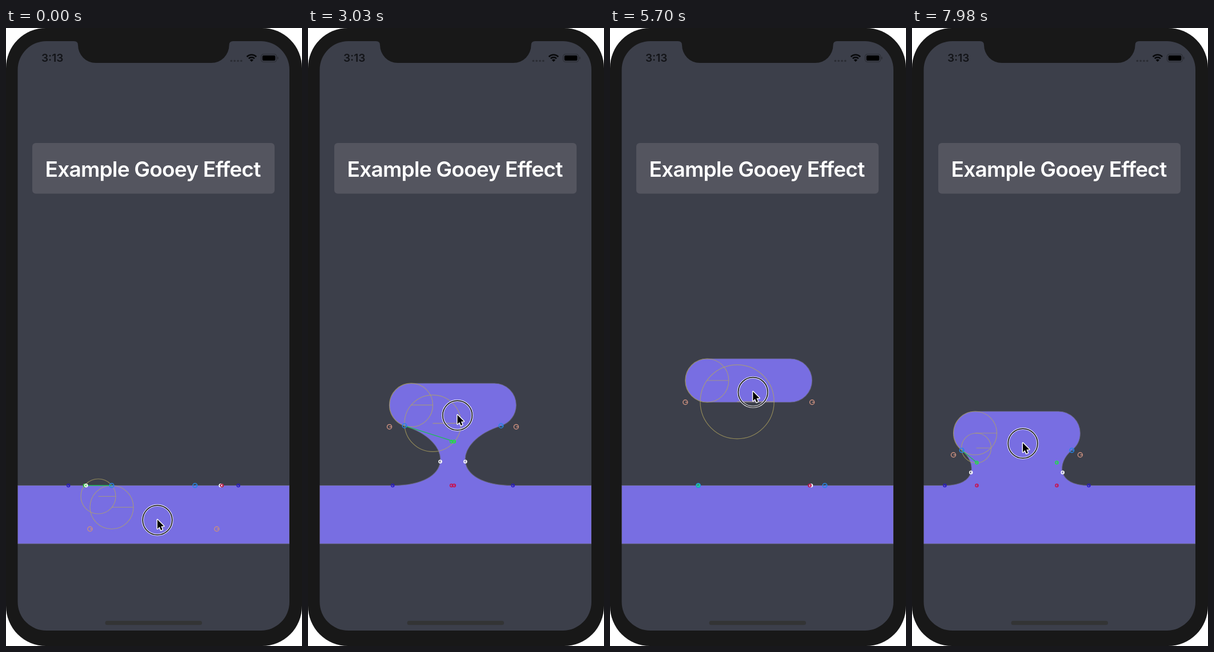
An HTML page with a canvas that plays this animation: 518x1080 px, repeating every 8 s.

```html
<!DOCTYPE html>
<html lang="en">
<head>
<meta charset="utf-8">
<title>Gooey effect</title>
<style>
  html, body { margin: 0; width: 100%; height: 100%; overflow: hidden; background: #fff; }
  canvas { position: absolute; left: 0; top: 0; width: 518px; height: 1080px; }
  .title, .clock { position: absolute; margin: 0; font-family: Inter, "Open Sans", sans-serif; font-weight: 600; white-space: nowrap; }
  .title { left: 46px; top: 202px; width: 424px; height: 88.5px; box-sizing: border-box; padding-right: 2px;
    display: flex; align-items: center; justify-content: center;
    color: #fff; font-size: 37px; letter-spacing: -.77px; }
  .clock { left: 62px; top: 40px; line-height: 25px; font-size: 19px; color: #131418; }
</style>
</head>
<body>
<canvas id="stage" width="518" height="1080"></canvas>
<h1 class="title">Example Gooey Effect</h1>
<div class="clock">3:13</div>
<script>
const ctx = document.getElementById('stage').getContext('2d');
const LOOP = 8000, TAU = Math.PI * 2;
const BAR = { left: 20.5, right: 496, top: 799.5, bottom: 901.2 };
const PILL = { w: 221.8, h: 76, r: 38 };
const BREAK = 217;
const GUIDE = 'rgba(180,167,95,.7)';
const COLOR = { edge: '#2486e6', ctrl: '#22dd48', mid: '#ffffff', foot: '#c8124e', base: '#2a1cc0', corner: '#c98f7e' };

// time, pill left, pill top, touch x, touch y
const path = [
  [0, 147, 799.5, 265, 860],
  [1890, 144, 702.5, 263.7, 755],
  [3030, 142.5, 621, 261.5, 677],
  [3900, 138, 584, 256.5, 641],
  [4950, 133.5, 528.5, 253, 585],
  [6240, 130, 620, 247, 679],
  [8000, 72.5, 670, 194, 726]
];

// rise, join angle, control x, control lift, base half width, guide x, guide y, guide radius, base lag
const shape = [
  [0, -90, -120, 0, 148.7, 14.5, 19, 30.5, 0],
  [97, -8, -117.5, 16, 140, 16, 60, 31.5, 0],
  [129.5, 52, -70, 40, 126, 40, 64, 26, 0],
  [179, 72.5, 3, 77.2, 105, 76.2, 70, 49.7, 0],
  [215.5, 73, 29.2, 104.5, 96.9, 90.5, 74.5, 64, 2.2],
  [271, 73, 29.2, 104.5, 96.9, 92.5, 81, 69.5, 2.2]
];

function segment(rows, v) {
  let i = 0;
  while (i < rows.length - 2 && v > rows[i + 1][0]) i++;
  return i;
}

function linear(rows, v) {
  const i = segment(rows, v), a = rows[i], b = rows[i + 1];
  const k = Math.max(0, Math.min(1, (v - a[0]) / (b[0] - a[0])));
  return a.map((n, c) => n + (b[c] - n) * k);
}

// monotone cubic interpolation, at rest at both ends
function smooth(rows, v) {
  const i = segment(rows, v), a = rows[i], b = rows[i + 1];
  const h = b[0] - a[0], k = (v - a[0]) / h;
  const rate = (j, c) => (rows[j + 1][c] - rows[j][c]) / (rows[j + 1][0] - rows[j][0]);
  const slope = (j, c) => {
    if (j === 0 || j === rows.length - 1) return 0;
    const p = rate(j - 1, c), q = rate(j, c);
    return p * q > 0 ? 2 * p * q / (p + q) : 0;
  };
  const k2 = k * k, k3 = k2 * k;
  return a.map((n, c) => c === 0 ? v :
    n * (2 * k3 - 3 * k2 + 1) + b[c] * (3 * k2 - 2 * k3) +
    h * (slope(i, c) * (k3 - 2 * k2 + k) + slope(i + 1, c) * (k3 - k2)));
}

function roundRect(x, y, w, h, r, color) {
  ctx.beginPath();
  ctx.roundRect(x, y, w, h, r);
  ctx.fillStyle = color;
  ctx.fill();
}

function ring(x, y, r, color, width) {
  ctx.beginPath();
  ctx.arc(x, y, r, 0, TAU);
  ctx.moveTo(x, y);
  ctx.lineTo(x + r, y);
  ctx.strokeStyle = color;
  ctx.lineWidth = width;
  ctx.stroke();
}

const guide = (x, y, r) => ring(x, y, r, GUIDE, 1.2);
const dot = (p, color, r = 2.5) => ring(p.x, p.y, r, color, 1.5);

function paint() {
  ctx.fillStyle = '#786ee2';
  ctx.fill();
  ctx.strokeStyle = 'rgba(106,104,128,.8)';
  ctx.lineWidth = 1.1;
  ctx.stroke();
}

function drawPhone() {
  ctx.clearRect(0, 0, 518, 1080);
  roundRect(0, 0, 518, 1080, 70, '#181818');
  roundRect(20.5, 23, 475.5, 1030, 50, '#3c3f4a');
  ctx.beginPath();
  ctx.moveTo(119, 22);
  ctx.lineTo(119, 23);
  ctx.quadraticCurveTo(126, 23, 126, 30);
  ctx.arcTo(126, 61, 158, 61, 31);
  ctx.lineTo(359, 61);
  ctx.arcTo(390.5, 61, 390.5, 30, 31);
  ctx.lineTo(390.5, 30);
  ctx.quadraticCurveTo(390.5, 23, 397.5, 23);
  ctx.lineTo(397.5, 22);
  ctx.fillStyle = '#181818';
  ctx.fill();
}

function drawStatus() {
  for (let i = 0; i < 4; i++) roundRect(392.5 + i * 5.8, 55.8, 3.6, 3.2, 1.6, '#2a2c33');
  ctx.strokeStyle = '#08090b';
  ctx.lineWidth = 2.6;
  for (const r of [7.2, 11.7]) {
    ctx.beginPath();
    ctx.arc(429.8, 58.5, r, -Math.PI * .75, -Math.PI * .25);
    ctx.stroke();
  }
  ctx.beginPath();
  ctx.moveTo(429.8, 59);
  ctx.arc(429.8, 59, 4.4, -Math.PI * .75, -Math.PI * .25);
  ctx.fillStyle = '#08090b';
  ctx.fill();
  ctx.beginPath();
  ctx.roundRect(446.5, 45.8, 27, 13.4, 4);
  ctx.strokeStyle = '#2c2e35';
  ctx.lineWidth = 1.2;
  ctx.stroke();
  roundRect(448.7, 48, 22.6, 9, 2, '#000');
  roundRect(474.8, 50.3, 1.7, 4.4, 1, '#2c2e35');
  roundRect(46, 201, 424, 88.5, 6, '#54555f');
  roundRect(173.5, 1036, 169.5, 7.3, 3.6, '#333435');
}

// key points on one side: dir is -1 for left, 1 for right
function sidePoints(dir, cx, top, g) {
  const [, deg, ctrl, lift, half, , , , lag] = g;
  const a = deg * Math.PI / 180, base = cx + lag;
  const edge = {
    x: cx + dir * (PILL.w / 2 - PILL.r + PILL.r * Math.cos(a)),
    y: top + PILL.r + PILL.r * Math.sin(a)
  };
  const cp = { x: base - dir * ctrl, y: BAR.top - lift };
  const foot = { x: cp.x, y: BAR.top };
  const end = { x: base + dir * half, y: BAR.top };
  const halfway = c => (edge[c] + 3 * cp[c] + 3 * foot[c] + end[c]) / 8;
  return { a, edge, cp, foot, end, mid: { x: halfway('x'), y: halfway('y') } };
}

function drawJoined(left, top, L, R) {
  const cy = top + PILL.r;
  ctx.beginPath();
  ctx.moveTo(BAR.left, BAR.top);
  ctx.lineTo(L.end.x, L.end.y);
  ctx.bezierCurveTo(L.foot.x, L.foot.y, L.cp.x, L.cp.y, L.edge.x, L.edge.y);
  ctx.arc(left + PILL.r, cy, PILL.r, Math.PI - L.a, Math.PI * 1.5);
  ctx.arc(left + PILL.w - PILL.r, cy, PILL.r, -Math.PI / 2, R.a);
  ctx.bezierCurveTo(R.cp.x, R.cp.y, R.foot.x, R.foot.y, R.end.x, R.end.y);
  ctx.lineTo(BAR.right, BAR.top);
  ctx.lineTo(BAR.right, BAR.bottom);
  ctx.lineTo(BAR.left, BAR.bottom);
  ctx.closePath();
  paint();
}

function drawApart(left, top) {
  ctx.beginPath();
  ctx.rect(BAR.left, BAR.top, BAR.right - BAR.left, BAR.bottom - BAR.top);
  paint();
  ctx.beginPath();
  ctx.roundRect(left, top, PILL.w, PILL.h, PILL.r);
  paint();
}

function drawJoinMarks(L, R) {
  ctx.beginPath();
  ctx.moveTo(L.edge.x, L.edge.y);
  ctx.lineTo(L.cp.x, L.cp.y);
  ctx.strokeStyle = '#1fbf55';
  ctx.lineWidth = 1.3;
  ctx.stroke();
  for (const side of [L, R]) {
    dot(side.edge, COLOR.edge, 3.8);
    dot(side.end, COLOR.base);
  }
  dot(L.foot, COLOR.foot);
  for (const side of [L, R]) {
    dot(side.cp, COLOR.ctrl);
    dot(side.mid, COLOR.mid);
  }
  dot(R.foot, COLOR.foot);
}

function drawRestMarks() {
  const at = x => ({ x, y: BAR.top });
  dot(at(154.5), COLOR.edge, 3.8);
  dot(at(154.5), '#18d890');
  dot(at(352), COLOR.mid);
  dot(at(349.5), COLOR.foot);
  dot(at(376), COLOR.edge, 3.8);
}

function drawTouch(x, y) {
  const circle = (r, color, width) => {
    ctx.beginPath();
    ctx.arc(x, y, r, 0, TAU);
    ctx.strokeStyle = color;
    ctx.lineWidth = width;
    ctx.stroke();
  };
  circle(25.8, 'rgba(240,240,244,.9)', 3.8);
  circle(25.8, '#08080c', 1.5);
  const arrow = [[0, 0], [0, 16], [3.6, 12.6], [6.1, 18.4], [8.7, 17.2], [6.3, 11.5], [11.2, 11.3]];
  ctx.beginPath();
  for (const [dx, dy] of arrow) ctx.lineTo(x + dx, y - .8 + dy);
  ctx.closePath();
  ctx.lineJoin = 'round';
  ctx.strokeStyle = '#fff';
  ctx.lineWidth = 2.8;
  ctx.stroke();
  ctx.fillStyle = '#000';
  ctx.fill();
}

function draw(t) {
  const [, left, top, tx, ty] = smooth(path, t);
  const rise = BAR.top - top, cx = left + PILL.w / 2;
  const g = linear(shape, rise);
  const L = sidePoints(-1, cx, top, g), R = sidePoints(1, cx, top, g);
  const joined = rise < BREAK;

  drawPhone();
  drawStatus();
  ctx.save();
  ctx.beginPath();
  ctx.rect(BAR.left, 23, BAR.right - BAR.left, 1030);
  ctx.clip();
  if (joined) drawJoined(left, top, L, R);
  else drawApart(left, top);
  ctx.restore();

  guide(left + PILL.r, top + PILL.r, PILL.r);
  guide(left + g[5], top + g[6], g[7]);
  for (const x of [left, left + PILL.w]) dot({ x, y: top + PILL.h }, COLOR.corner, 4);
  if (joined) drawJoinMarks(L, R);
  else drawRestMarks();
  drawTouch(tx, ty);
}

const start = performance.now();
function tick() {
  draw((performance.now() - start) % LOOP);
  requestAnimationFrame(tick);
}
tick();
</script>
</body>
</html>
```
